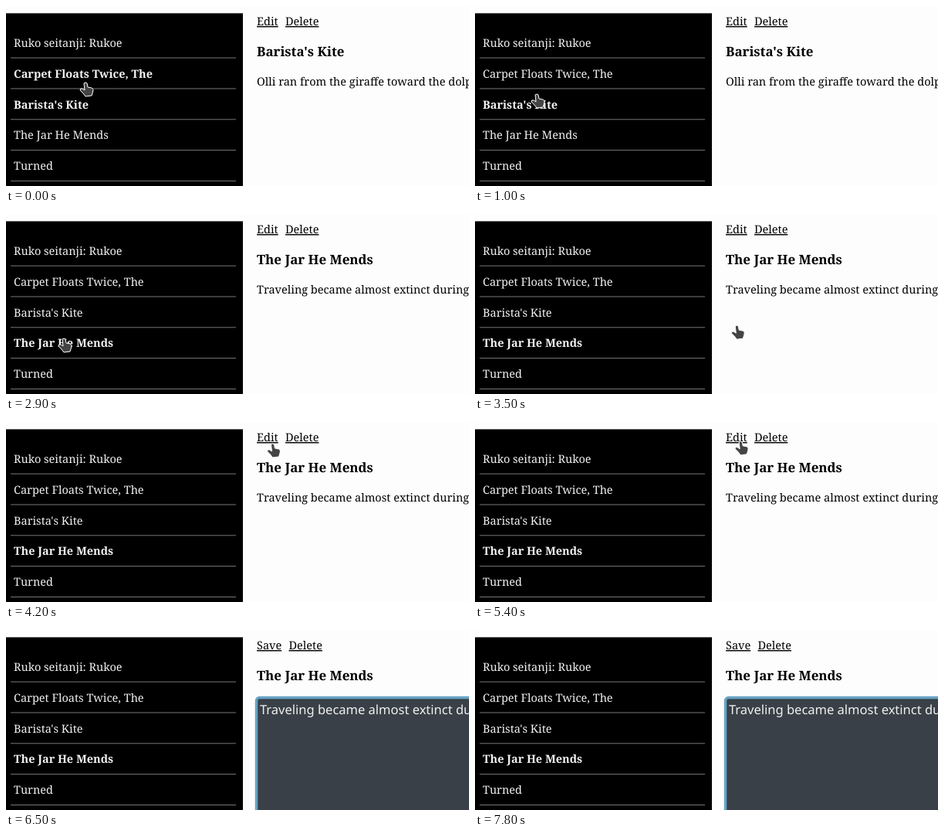
An HTML page for the animation above (8 s loop, 600 by 233 pixels).

```html
<!DOCTYPE html>
<html lang="en">
<head>
<meta charset="utf-8">
<style>
  html, body { margin: 0; height: 100%; overflow: hidden; background: #fefdfe; }
  svg { display: block; width: 600px; height: 233px; }
  text { font: 14.5px "Noto Serif", serif; white-space: pre; text-rendering: geometricPrecision; }
  #list text { fill: #f2f2f2; }
  #list line { stroke: #777; }
  .link { text-decoration: underline; }
  .bold, #title { font-weight: bold; }
  #title { font-size: 16.96px; }
  #editor text { font: 16.5px "Noto Sans", sans-serif; fill: #f0f0f0; }
</style>
</head>
<body>
<svg viewBox="0 0 600 233">
  <g id="list"><rect y="9.4" width="307" height="224"/></g>
  <text id="action" class="link" x="325" y="25"></text>
  <text id="delete" class="link" y="25">Delete</text>
  <text id="title" x="325" y="65"></text>
  <text id="story" x="325" y="103"></text>
  <g id="editor">
    <rect id="box" rx="4" width="320" height="190" fill="#394047"/>
    <text x="329" y="109">Traveling became almost extinct during</text>
  </g>
  <path id="hand" fill="#444" stroke="#fff" stroke-linejoin="round"
    d="M-2 1Q0-1 2 1L3 6L8 7Q10 8 10 10L9 14L8 17L0 18L-3 14L-7 10Q-7 7-4 8L-1 10Z"/>
</svg>
<script>
const $ = id => document.getElementById(id);
const titles = ["Ruko seitanji: Rukoe", "Carpet Floats Twice, The", "Barista's Kite",
  "The Jar He Mends", "Turned"];
const stories = { 2: "Olli ran from the giraffe toward the dolphin",
  3: "Traveling became almost extinct during" };
const PITCH = 39.85;
const SELECT = 2500, EDIT = 5550, FOCUS = 6500, LEAVE = 6300, LOOP = 8000;

// pointer tip: time, x, y
const path = [[0, 103, 99], [300, 103, 99], [900, 80, 114], [1200, 80, 114],
  [1600, 68, 182], [1900, 66, 163], [2200, 66, 163], [2500, 75, 161], [3000, 75, 161],
  [3400, 330, 155], [3700, 365, 114], [4100, 345.5, 28], [5000, 345.5, 28],
  [5500, 344, 24.5], [5900, 344, 24.5], [LEAVE, 390, 88]];

const svgNode = (tag, attrs) => {
  const node = document.createElementNS("http://www.w3.org/2000/svg", tag);
  for (const key in attrs) node.setAttribute(key, attrs[key]);
  return $("list").appendChild(node);
};
const rows = titles.map((title, i) => {
  const y = PITCH * i;
  svgNode("line", { x1: 6, x2: 298, y1: y + 67.1, y2: y + 67.1 });
  const row = svgNode("text", { x: 10, y: y + 52.8 });
  row.textContent = title;
  return row;
});

function pointer(t) {
  const i = path.findIndex(p => p[0] > t);
  if (i < 0) return path.at(-1).slice(1);
  const [a, b] = [path[i - 1], path[i]];
  const u = (t - a[0]) / (b[0] - a[0]), e = u * u * (3 - 2 * u);
  return [a[1] + (b[1] - a[1]) * e, a[2] + (b[2] - a[2]) * e];
}

function draw(t) {
  const [x, y] = pointer(t), editing = t >= EDIT, focused = t >= FOCUS;
  const selected = t < SELECT ? 2 : 3;
  const hovered = x < 306 ? Math.floor((y - 27) / PITCH) : -1;
  rows.forEach((row, i) => row.classList.toggle("bold", i === selected || i === hovered));

  $("title").textContent = titles[selected];
  $("story").textContent = editing ? "" : stories[selected];
  $("action").textContent = editing ? "Save" : "Edit";
  $("delete").setAttribute("x", editing ? 366.5 : 362);

  $("editor").style.display = editing ? "" : "none";
  const inset = focused ? 324.5 : 326;
  $("box").setAttribute("x", inset);
  $("box").setAttribute("y", inset - 237);
  $("box").setAttribute("stroke", focused ? "#66a3c4" : "#858b8d");
  $("box").setAttribute("stroke-width", focused ? 3.5 : 2);

  $("hand").style.display = t < LEAVE ? "" : "none";
  $("hand").setAttribute("transform", `translate(${x} ${y})`);
}

function tick(now) {
  draw(now % LOOP);
  requestAnimationFrame(tick);
}
requestAnimationFrame(tick);
</script>
</body>
</html>
```
